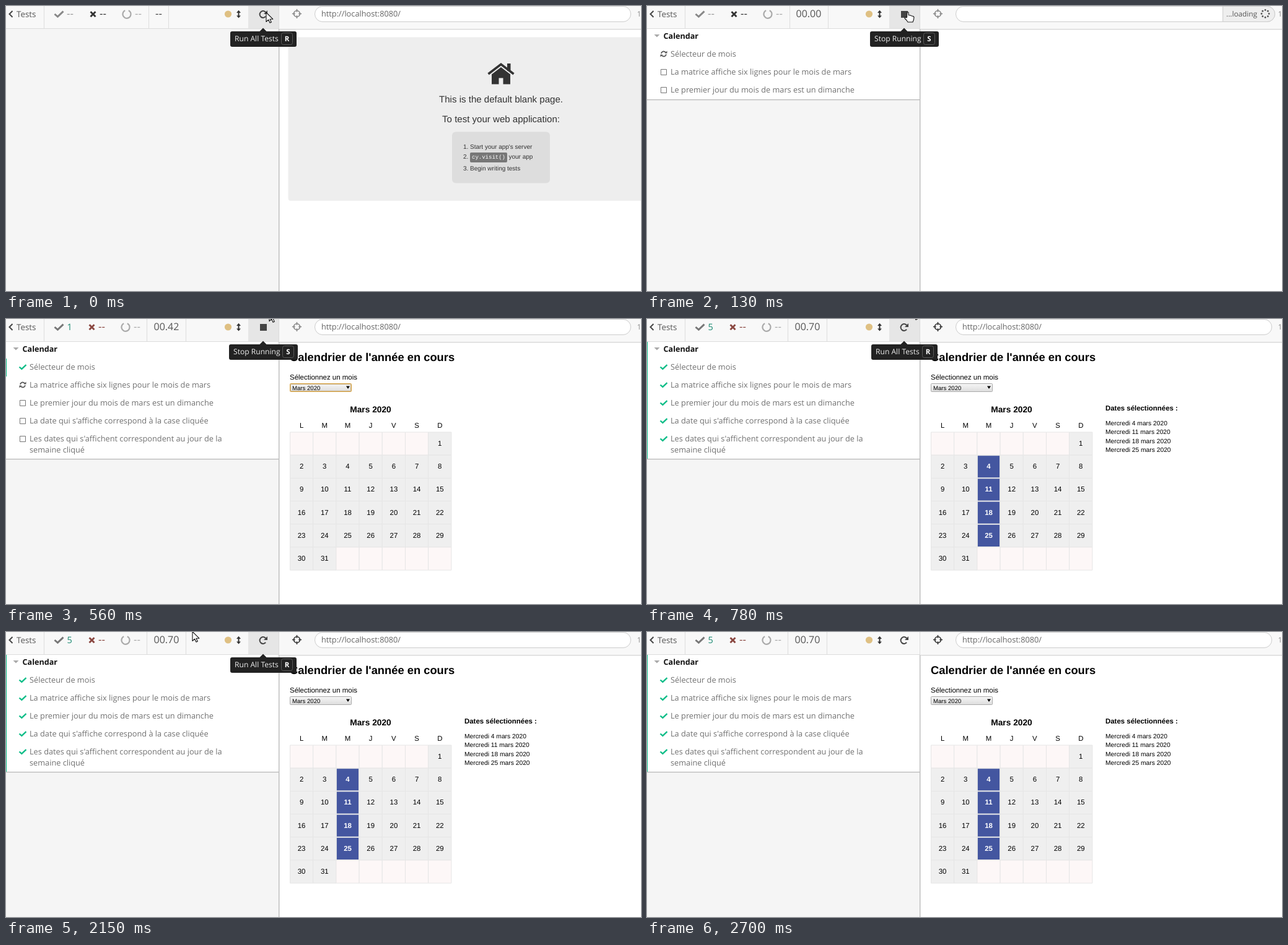
Recreate the animation shown at these times as an HTML page with a canvas. Size 1025x461 px, loop 3630 ms.

```html
<!DOCTYPE html>
<html lang="fr">
<head>
<meta charset="utf-8">
<title>Calendar tests</title>
<style>
html, body { margin: 0; width: 100%; height: 100%; overflow: hidden; background: #fff; }
canvas { display: block; }
</style>
</head>
<body>
<canvas id="stage" width="1025" height="461"></canvas>
<script>
const ctx = document.getElementById('stage').getContext('2d');
ctx.textRendering = 'geometricPrecision';
const LOOP = 3630;
const UI = '"Open Sans", sans-serif';
const PAGE = '"Liberation Sans", Arial, sans-serif';
const MONO = '"Liberation Mono", monospace';
const GREEN = '#0bbd87';
const TESTS = [
  ['Sélecteur de mois'],
  ['La matrice affiche six lignes pour le mois de mars'],
  ['Le premier jour du mois de mars est un dimanche'],
  ["La date qui s'affiche correspond à la case cliquée"],
  ["Les dates qui s'affichent correspondent au jour de la", 'semaine cliqué']
];

// Test run: start time, listed tests, passed tests, clock, page, selected days
const RUN = [
  [0, 0, 0, '--', 'home', 0],
  [70, 0, 0, '--', 'loading', 0],
  [130, 3, 0, '00.00', 'loading', 0],
  [220, 5, 0, '00.08', 'loading', 0],
  [300, 5, 0, '00.16', 'loading', 0],
  [390, 5, 0, '00.25', 'calendar', 0],
  [470, 5, 0, '00.33', 'calendar', 0],
  [560, 5, 1, '00.42', 'calendar', 0],
  [630, 5, 3, '00.51', 'calendar', 0],
  [700, 5, 4, '00.61', 'calendar', 2],
  [780, 5, 5, '00.70', 'calendar', 4]
];

// Pointer: start time, x, y
const POINTER = [
  [0, 420, 10], [70, 421, 10], [300, 421, 7], [390, 422, 2], [470, 423, -4],
  [560, 425, -12], [630, 426, -13], [700, 427, -15], [780, 428, -16],
  [1750, 423, -15], [1830, 404, -13], [1910, 381, -10], [1990, 354, -7],
  [2070, 325, -4], [2150, 301, -1], [2220, 396, 54], [2310, 472, 112],
  [2390, 550, 184], [2470, 628, 268], [2540, 700, 356], [2620, 768, 445],
  [2700, 840, 540]
];

const current = (list, t) => list.filter(step => step[0] <= t).pop();

function text(s, x, y, size, color, family = UI, weight = 400, align = 'left') {
  ctx.font = `${weight} ${size}px ${family}`;
  ctx.textAlign = align;
  ctx.fillStyle = color;
  ctx.fillText(s, x, y);
}

function rect(x, y, w, h, color) {
  ctx.fillStyle = color;
  ctx.fillRect(x, y, w, h);
}

function box(x, y, w, h, r, fill, stroke) {
  ctx.beginPath();
  ctx.roundRect(x, y, w, h, r);
  paint(fill, stroke, 1);
}

function paint(fill, stroke, width) {
  if (fill) { ctx.fillStyle = fill; ctx.fill(); }
  if (stroke) { ctx.strokeStyle = stroke; ctx.lineWidth = width; ctx.stroke(); }
}

function shape(points, fill, stroke, width = 1) {
  ctx.beginPath();
  points.forEach(([x, y]) => ctx.lineTo(x, y));
  if (fill) ctx.closePath();
  paint(fill, stroke, width);
}

function arc(x, y, r, from, to, color, width) {
  ctx.beginPath();
  ctx.arc(x, y, r, from * Math.PI / 180, to * Math.PI / 180);
  paint(null, color, width);
}

function vertical(x, y, h, color) { rect(x, y, 1, h, color); }

function check(x, y, size, color) {
  shape([[x - size, y], [x - size * .3, y + size * .62], [x + size, y - size * .62]],
    null, color, size * .42);
}

function cross(x, y, r, color) {
  shape([[x - r, y - r], [x + r, y + r]], null, color, 2.8);
  shape([[x + r, y - r], [x - r, y + r]], null, color, 2.8);
}

function reload(x, y) {
  arc(x, y, 5.4, 40, 320, '#444', 2);
  shape([[x + 7, y - 6.5], [x + 7, y - .5], [x + 1, y - .5]], '#444');
}

function spinning(x, y) {
  arc(x, y, 4, 190, 325, '#555', 1.8);
  arc(x, y, 4, 10, 145, '#555', 1.8);
  shape([[x + 5.5, y - 5], [x + 5.5, y - 1], [x + 1.5, y - 1]], '#555');
  shape([[x - 5.5, y + 5], [x - 5.5, y + 1], [x - 1.5, y + 1]], '#555');
}

function crosshair(x, y, color) {
  arc(x, y, 5, 0, 360, color, 1.6);
  for (const [dx, dy] of [[1, 0], [-1, 0], [0, 1], [0, -1]])
    shape([[x + dx * 2.8, y + dy * 2.8], [x + dx * 7.6, y + dy * 7.6]], null, color, 1.6);
}

function toolbar([, , passed, clock, page], idle, done) {
  const shift = passed ? -2 : 0;
  rect(0, 0, 440, 36, '#f8f8f8');
  rect(391, 0, 49, 36, idle ? '#f8f8f8' : '#e6e6e6');
  rect(0, 36, 440, 1, '#dcdcdc');
  shape([[10.5, 8], [5.5, 13], [10.5, 18]], null, '#444', 2);
  text('Tests', 17, 17.7, 13.4, '#555');
  vertical(61, 0, 36, '#ddd');

  check(85.5, 13, 7, passed ? '#777' : '#888');
  if (passed) text(passed, 98.5, 18, 14.5, '#1c8a72');
  else text('--', 98, 18.4, 17, '#999');
  cross(140.5 + shift, 13.3, 4, passed ? '#8a4740' : '#333');
  text('--', 151 + shift, 18.4, 17, passed ? '#8a4740' : '#333');
  arc(195 + shift, 13.2, 6.6, -65, 245, '#aaa', 2.2);
  text('--', 208 + shift, 18.4, 17, '#aaa');
  vertical(passed ? 227 : 230, 0, 36, '#ddd');
  if (clock === '--') text(clock, 241, 18.4, 17, '#444');
  else text(clock, passed ? 238.5 : 240.5, 18.2, 16, '#555');
  vertical(clock === '--' ? 262 : passed ? 290 : 292, 0, 36, '#ddd');

  ctx.beginPath();
  ctx.arc(358.5, 13, 5.6, 0, 7);
  paint('#dfc083');
  shape([[375.5, 10], [375.5, 17]], null, '#333', 2);
  shape([[375.5, 6.8], [379, 11], [372, 11]], '#333');
  shape([[375.5, 19.5], [379, 15.5], [372, 15.5]], '#333');
  if (done || page === 'home') reload(415, 13.5);
  else rect(410, 8, 11, 11, '#444');
}

function addressBar(page, done) {
  rect(441, 0, 584, 37, '#f8f8f8');
  rect(441, 37, 584, 1, '#d5d5d5');
  rect(441, 38, 584, 1, '#f3f3f3');
  crosshair(469.5, 12.5, done ? '#333' : '#888');
  const loading = page === 'loading';
  box(498.5, .5, loading ? 515 : 510, 25, 12.5, '#fff', '#ccc');
  if (loading) {
    box(929.5, .5, 84, 25, [0, 12.5, 12.5, 0], '#eee', '#ccc');
    text('...loading', 935, 17, 11.8, '#555');
    for (let i = 0; i < 8; i++) {
      const a = i * Math.PI / 4;
      ctx.beginPath();
      ctx.arc(998 + 6 * Math.cos(a), 12.5 + 6 * Math.sin(a), 1.4, 0, 7);
      paint('#555');
    }
  } else {
    text('http://localhost:8080/', 509, 17.4, 12.75, '#666');
  }
  text('1', 1018.5, 17, 12, '#888');
}

function testList(listed, passed, done) {
  rect(0, 37, 440, 424, '#f5f5f5');
  if (!listed) return;
  const bottom = listed === 5 ? 226 : 151;
  rect(0, 37, 440, bottom - 37, '#fff');
  rect(0, bottom, 440, 1, '#b8b8b8');
  rect(0, bottom + 1, 440, 1, '#e5e5e5');
  shape([[11.5, 46], [20.5, 46], [16, 50.5]], '#aaa');
  text('Calendar', 26.5, 53, 12.6, '#111', UI, 700);
  TESTS.slice(0, listed).forEach((lines, i) => {
    const y = 77.5 + i * 29;
    lines.forEach((line, n) => text(line, 38, y + 4.4 + n * 18, 12.75, '#717171'));
    if (i < passed) check(27, y, 5.5, GREEN);
    else if (i === passed) spinning(27, y);
    else box(22.5, y - 4, 9, 9, 0, null, '#777');
  });
  if (passed) rect(0, done ? 37 : 64, 1, done ? bottom - 37 : passed * 29, GREEN);
}

function homePage() {
  box(455.5, 50.5, 580, 264.5, 4, '#eee');
  const ink = '#333';
  rect(809, 93, 5.5, 12, ink);
  shape([[778.5, 110], [799, 94.3], [819.5, 110]], null, ink, 3.6);
  shape([[784, 110.5], [799, 99], [814, 110.5], [814, 126.5], [802.5, 126.5],
    [802.5, 116.5], [795.5, 116.5], [795.5, 126.5], [784, 126.5]], ink);
  text('This is the default blank page.', 799, 156, 15.05, ink, PAGE, 400, 'center');
  text('To test your web application:', 799, 188, 15.05, ink, PAGE, 400, 'center');
  box(720, 203.5, 158, 83, 6, '#ddd');
  ['1.', '2.', '3.'].forEach((n, i) => text(n, 738, [231, 247, 266][i], 10, ink, PAGE));
  text("Start your app's server", 749, 231, 10, ink, PAGE);
  box(749, 237, 60, 16, 2, '#777');
  text('cy.visit()', 752, 247.3, 9, '#fff', MONO);
  text('your app', 811.5, 247, 10, ink, PAGE);
  text('Begin writing tests', 749, 266, 10, ink, PAGE);
}

function monthSelect(focused) {
  const shade = ctx.createLinearGradient(0, 104, 0, 118);
  shade.addColorStop(0, '#f7f7f7');
  shade.addColorStop(1, '#dcdcdc');
  box(458.5, 104.5, 99, 13, 1, shade, focused ? '#d9a441' : '#aaa');
  if (focused) box(459.5, 105.5, 97, 11, 0, null, '#c9b28a');
  text('Mars 2020', 462, 114.6, 9.6, '#000', PAGE);
  shape([[549, 108.5], [555, 108.5], [552, 113]], '#000');
}

function calendarPage(selected, done) {
  text("Calendrier de l'année en cours", 458, 68, 18.33, '#000', PAGE, 700);
  text('Sélectionnez un mois', 458, 98, 11.47, '#000', PAGE);
  monthSelect(!selected);

  text('Mars 2020', 588.5, 151, 13.75, '#000', PAGE, 700, 'center');
  const pitch = 37.2;
  for (let i = 0; i < 42; i++) {
    const col = i % 7, row = Math.floor(i / 7), day = i - 5;
    const x = 458.5 + col * pitch, y = 183 + row * pitch, middle = x + pitch / 2;
    if (!row) text('LMMJVSD'[col], middle, 176, 11.45, '#000', PAGE, 400, 'center');
    const inMonth = day > 0 && day < 32;
    const chosen = col === 2 && row > 0 && row <= selected;
    box(x, y, pitch, pitch, 0, inMonth ? '#efefef' : '#fdf7f7', '#e6e6e6');
    if (chosen) rect(x + 1, y + 1, pitch - 2, pitch - 2, '#4456a0');
    if (inMonth) text(day, middle, Math.floor(y + 22.5), 11.45, chosen ? '#fff' : '#000', PAGE,
      chosen ? 700 : 400, 'center');
  }
  if (!selected) return;
  text('Dates sélectionnées :', 740, 148, 11.43, '#000', PAGE, 700);
  for (let i = 0; i < selected; i++)
    text(`Mercredi ${4 + 7 * i} mars 2020`, 740, 172 + i * 14.4, 10.27, '#000', PAGE);
}

function tooltip(label, key, half) {
  const left = 415.5 - half;
  shape([[415, 35.5], [421.5, 42], [408.5, 42]], '#222');
  box(left, 41, half * 2, 25, 3, '#222');
  text(label, left + 7, 57.2, 12.1, '#eee');
  const keyX = left + half * 2 - 24.5;
  box(keyX, 43.5, 18, 19, 3, '#222', '#5a5a5a');
  text(key, keyX + 9, 57.2, 11.5, '#fff', UI, 700, 'center');
}

function pointer(x, y, hand) {
  ctx.save();
  ctx.translate(x, y);
  ctx.lineJoin = 'round';
  if (hand) {
    shape([[-1, 0], [1, 0], [1.5, 5], [4, 5], [6, 6], [8.5, 6.5], [10, 8], [9.5, 12],
      [8, 16], [0, 16], [-2, 13], [-5, 10], [-4.5, 8], [-2, 9], [-1.5, 8]], '#fff', '#111', 1.1);
  } else {
    shape([[0, .5], [0, 15.5], [3.6, 12.2], [6, 17.3], [8.3, 16.3], [6, 11.2], [10.8, 11.2]],
      '#fff', '#111', 1.1);
  }
  ctx.restore();
}

function draw() {
  const t = performance.now() % LOOP;
  const state = current(RUN, t);
  const [, listed, passed, , page, selected] = state;
  const done = passed === 5, idle = t >= 2220;

  rect(0, 0, 1025, 461, '#fff');
  if (page === 'home') homePage();
  if (page === 'calendar') calendarPage(selected, done);
  addressBar(page, done);
  testList(listed, passed, done);
  toolbar(state, idle, done);
  vertical(440, 0, 37, '#dcdcdc');
  vertical(440, 37, 424, '#bcbcbc');
  vertical(441, 37, 424, '#e2e2e2');

  if (!idle) {
    if (done || page === 'home') tooltip('Run All Tests', 'R', 53.5);
    else tooltip('Stop Running', 'S', 55.5);
  }
  const [, x, y] = current(POINTER, t);
  pointer(x, y, t >= 70 && t < 560);
  requestAnimationFrame(draw);
}
draw();
</script>
</body>
</html>
```
